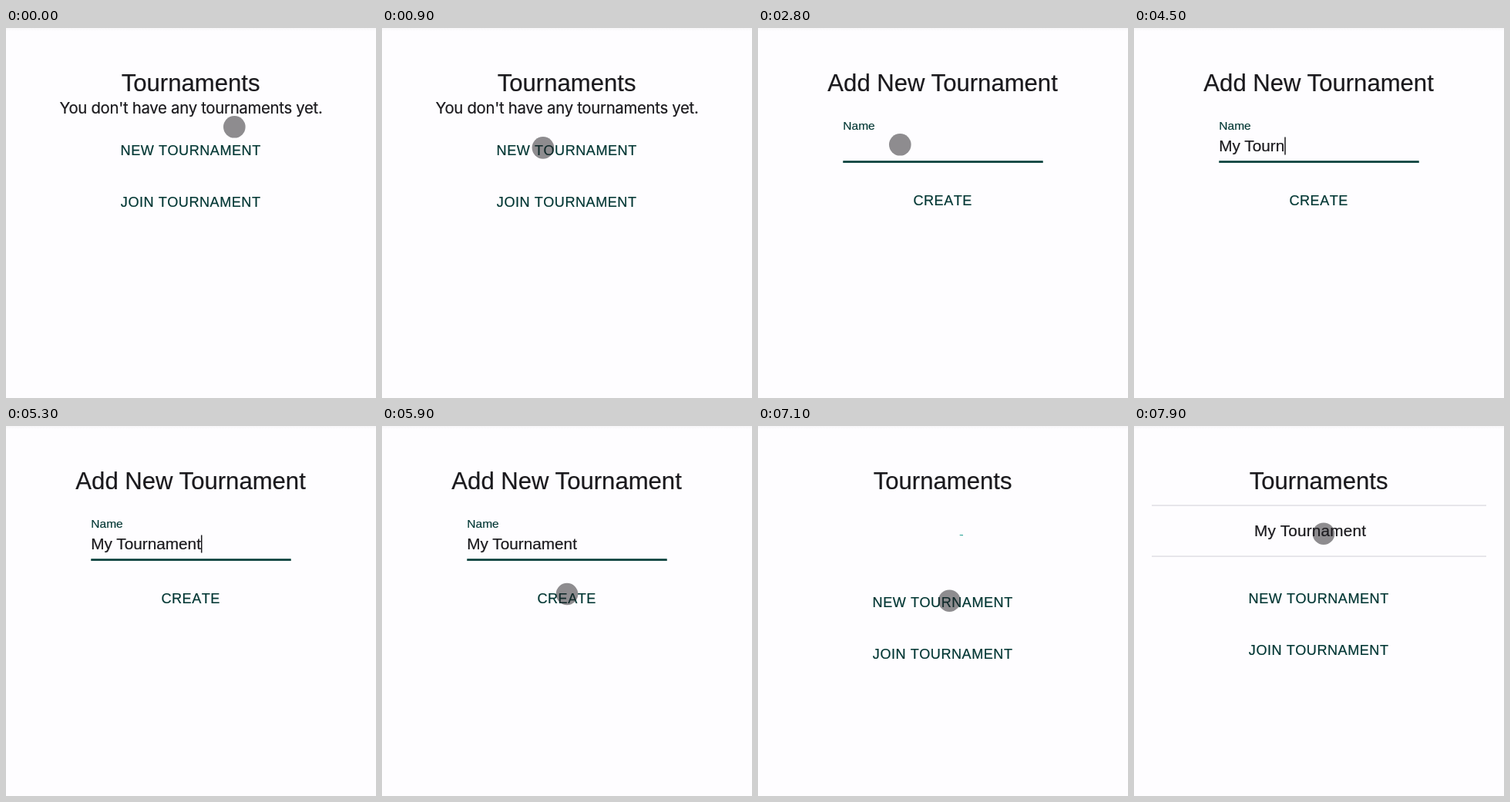
Recreate the animation shown at these times as an HTML page. Size 480 by 480 pixels, loop 8 s.

```html
<!DOCTYPE html>
<html lang="en">
<head>
<meta charset="utf-8">
<title>Tournaments</title>
<style>
  html, body { margin: 0; width: 100%; height: 100%; overflow: hidden; background: #fefdff; }
  svg { display: block; width: 100vw; height: 100vh; }
  text { font-family: "Liberation Sans", Arial, sans-serif; font-size: 20.75px; fill: #1a191d; stroke: #1a191d; stroke-width: .2px; white-space: pre; }
  .title { font-size: 31.1px; text-anchor: middle; }
  .note { font-family: Inter, sans-serif; font-size: 20.35px; letter-spacing: -.3px; text-anchor: middle; }
  .button { font-size: 18.1px; letter-spacing: .0286em; font-kerning: none; text-anchor: middle; }
  .button, .active { fill: #003633; stroke: #003633; }
  .idle { fill: #6c6b6e; stroke: none; }
  .item { letter-spacing: .0094em; }
  .rule { fill: #dcdbe0; }
</style>
</head>
<body>
<svg viewBox="0 0 480 480">
  <defs>
    <linearGradient id="shade" x2="0" y2="1">
      <stop stop-color="#f7f6f8"/>
      <stop offset="1" stop-color="#fefdff"/>
    </linearGradient>
  </defs>
  <rect width="480" height="4" fill="url(#shade)"/>

  <g id="home">
    <text class="title" x="239.6" y="82">Tournaments</text>
    <text class="note" id="empty" x="240" y="111">You don't have any tournaments yet.</text>
    <circle id="spinner" r="20.2" fill="none" stroke="#2fa598" stroke-width="3.6"/>
    <g id="list">
      <rect class="rule" x="23" y="102.4" width="434" height="1.3"/>
      <text class="item" x="156" y="143">My Tournament</text>
      <rect class="rule" x="23" y="168.4" width="434" height="1.3"/>
    </g>
    <g id="buttons">
      <text class="button" x="239.7">NEW TOURNAMENT</text>
      <text class="button" x="239.7" y="67">JOIN TOURNAMENT</text>
    </g>
  </g>

  <g id="form">
    <text class="title" x="239.6" y="82">Add New Tournament</text>
    <text id="label">Name</text>
    <text id="value" x="110.3" y="160.3"></text>
    <rect id="caret" y="141.5" width="1.5" height="23" fill="#1a191d"/>
    <rect x="110.3" y="173.6" width="259.4" height="1.3" fill="#939294"/>
    <rect id="focusLine" y="172.2" height="2.6" fill="#003f3a"/>
    <text class="button" x="239.7" y="229.8">CREATE</text>
  </g>

  <circle id="pointer" r="14.3" fill="#1e1c20" fill-opacity=".5"/>
</svg>
<script>
  const LOOP = 8000, TICK = 100;
  const FORM_IN = 1600, FOCUS = 2450, CARET_IN = 3000, FORM_OUT = 7000, SPIN = 7100, LIST_IN = 7400;
  const NAME = 'My Tournament', TYPE_FROM = 3200, KEY_GAP = 175;

  // Each stroke eases through its [time, x, y] points; the pointer is hidden between strokes
  const STROKES = [
    [[0, 296.3, 128.3], [100, 283.3, 96.3]],
    [[600, 284, 122], [1000, 195, 161.5], [1700, 205.2, 160.8], [2800, 184.3, 151.3], [3200, 226, 210]],
    [[5500, 262, 194], [5900, 240, 218], [6100, 241, 226.7], [7100, 248.3, 226.7],
     [7400, 248.3, 226.7], [7700, 268.7, 96.3], [7900, 246, 139.7]]
  ];

  const el = id => document.getElementById(id);
  const [home, empty, spinner, list, buttons, form, label, value, caret, focusLine, pointer] =
    ['home', 'empty', 'spinner', 'list', 'buttons', 'form', 'label', 'value', 'caret', 'focusLine', 'pointer'].map(el);

  const clamp = p => Math.min(1, Math.max(0, p));
  const mix = (a, b, p) => a + (b - a) * p;
  const smooth = p => p * p * (3 - 2 * p);
  const show = (node, on) => { node.style.display = on ? '' : 'none'; };
  const set = (node, attrs) => { for (const k in attrs) node.setAttribute(k, attrs[k]); };

  function drawPointer(t) {
    const stroke = STROKES.find(s => t >= s[0][0] && t <= s[s.length - 1][0]);
    show(pointer, stroke);
    if (!stroke) return;
    const i = Math.max(1, stroke.findIndex(point => point[0] >= t));
    const [t0, x0, y0] = stroke[i - 1], [t1, x1, y1] = stroke[i];
    const p = smooth((t - t0) / (t1 - t0));
    set(pointer, { cx: mix(x0, x1, p), cy: mix(y0, y1, p) });
  }

  function drawHome(t) {
    const done = t >= FORM_OUT, loaded = t >= LIST_IN;
    show(empty, !done);
    show(list, loaded);
    show(spinner, t >= SPIN && !loaded);
    set(buttons, { transform: `translate(0 ${loaded ? 229.8 : done ? 235 : 164.8})` });
    const age = Math.max(0, t - SPIN), p = smooth(clamp(age / 700));
    set(spinner, {
      transform: `translate(240 141) scale(1.18) rotate(${age / 1400 * 360})`,
      'stroke-dasharray': `${mix(1, 100, p)} 200`,
      'stroke-dashoffset': -15 * p
    });
  }

  function drawForm(t) {
    const p = 1 - Math.pow(1 - clamp((t - FOCUS) / 200), 3);
    set(label, {
      class: t < FOCUS ? 'idle' : 'active',
      transform: `translate(110.3 ${mix(161.5, 132, p)}) scale(${mix(1, .75, p)})`
    });
    set(focusLine, { x: 240 - 129.7 * p, width: 259.4 * p });

    const typed = Math.min(NAME.length, Math.max(0, Math.floor((t - TYPE_FROM) / KEY_GAP) + 1));
    value.textContent = NAME.slice(0, typed);
    const since = t - (typed ? TYPE_FROM + (typed - 1) * KEY_GAP : CARET_IN);
    show(caret, since >= 0 && since % 1000 < 500);
    set(caret, { x: 110.3 + (typed ? value.getComputedTextLength() : 0) });
  }

  function draw() {
    const t = Math.floor(performance.now() % LOOP / TICK) * TICK;
    const onForm = t >= FORM_IN && t < FORM_OUT;
    show(form, onForm);
    show(home, !onForm);
    if (onForm) drawForm(t); else drawHome(t);
    drawPointer(t);
    requestAnimationFrame(draw);
  }
  draw();
</script>
</body>
</html>
```
